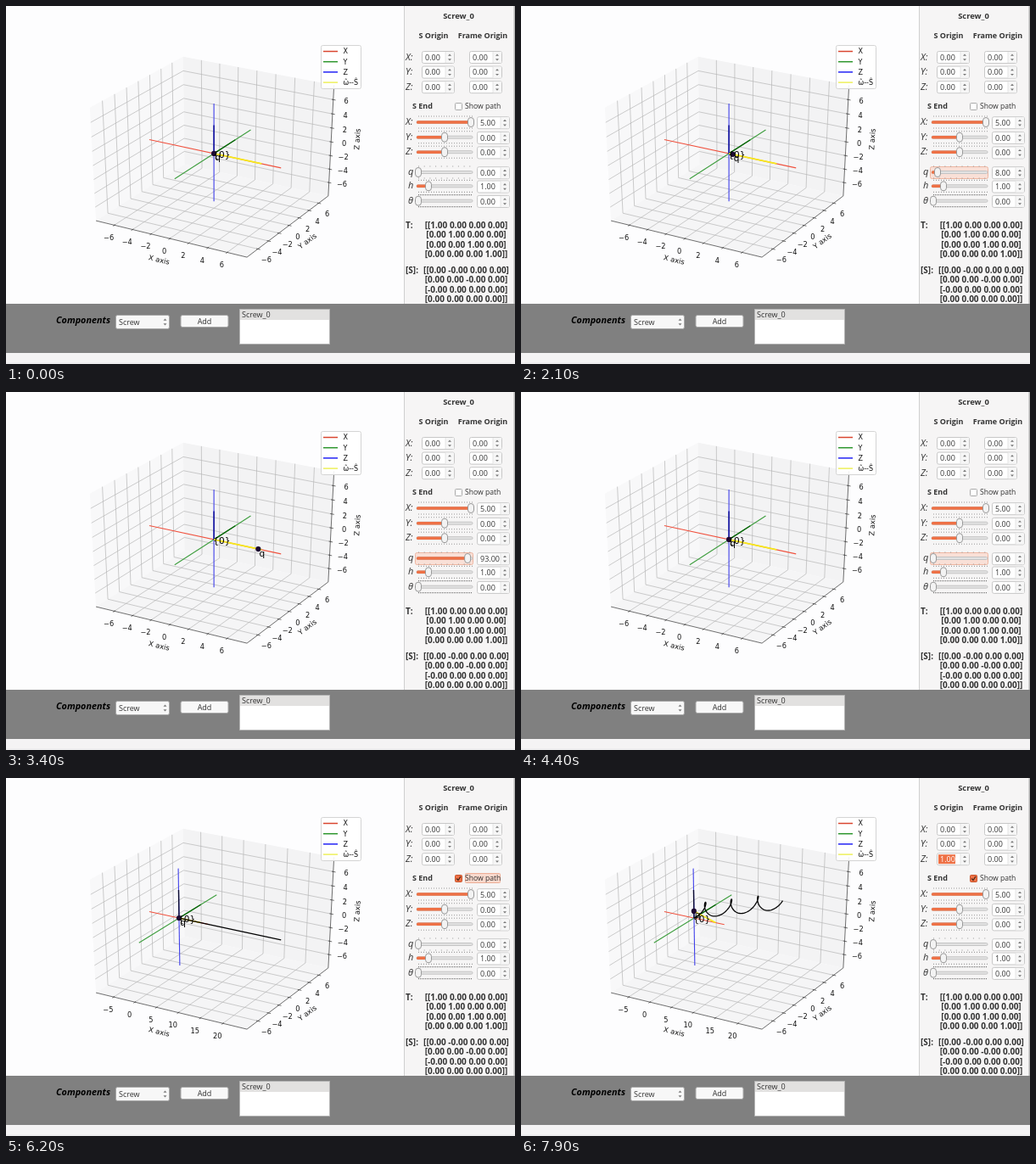
Write an HTML page with a canvas that moves like this. It is 600 px wide and 422 px high and loops after 8000 ms.

```html
<!DOCTYPE html>
<html lang="en">
<head>
<meta charset="utf-8">
<title>Screw motion viewer</title>
<style>
html, body { margin: 0; width: 100%; height: 100%; overflow: hidden; background: #fdfdfe; }
canvas { display: block; width: 600px; height: 422px; }
</style>
</head>
<body>
<canvas id="stage"></canvas>
<script>
const canvas = document.getElementById('stage');
const ctx = canvas.getContext('2d');
const dpr = window.devicePixelRatio || 1;
canvas.width = 600 * dpr;
canvas.height = 422 * dpr;

const UI = '"Open Sans", "Noto Sans", sans-serif';
const PLOT = '"DejaVu Sans", sans-serif';
const ORANGE = '#ee7146';

function text(str, x, y, { size = 9, font = UI, style = '', color = '#333', align = 'left', turn = 0 } = {}) {
  ctx.save();
  ctx.translate(x, y);
  ctx.rotate(turn * Math.PI / 180);
  ctx.font = `${style} ${size}px ${font}`;
  ctx.textAlign = align;
  ctx.textBaseline = 'alphabetic';
  ctx.fillStyle = color;
  ctx.fillText(str, 0, size * 0.36);
  ctx.restore();
}

function rect(x, y, w, h, fill, stroke, r = 0) {
  ctx.beginPath();
  ctx.roundRect(x, y, w, h, r);
  if (fill) { ctx.fillStyle = fill; ctx.fill(); }
  if (stroke) { ctx.strokeStyle = stroke; ctx.lineWidth = 1; ctx.stroke(); }
}

function line(points, color, width = 1) {
  ctx.beginPath();
  points.forEach(p => ctx.lineTo(p[0], p[1]));
  ctx.strokeStyle = color;
  ctx.lineWidth = width;
  ctx.stroke();
}

function fillPoly(points, color) {
  ctx.beginPath();
  points.forEach(p => ctx.lineTo(p[0], p[1]));
  ctx.fillStyle = color;
  ctx.fill();
}

function arrows(x, y, gap) {
  fillPoly([[x - 2, y - gap], [x + 2, y - gap], [x, y - gap - 2.2]], '#777');
  fillPoly([[x - 2, y + gap], [x + 2, y + gap], [x, y + gap + 2.2]], '#777');
}

// ---------- 3D plot ----------

// Perspective view of the unit cube: azimuth -60, elevation 30, distance 10.
function project(x, y, z) {
  const depth = 10 - (0.433 * x - 0.75 * y + 0.5 * z);
  return [245.1 + 2054 * (0.866 * x + 0.5 * y) / depth,
          173.9 - 1524 * (-0.25 * x + 0.433 * y + 0.866 * z) / depth];
}

const MARGIN = 1.1457;
const PATH_END = 23.1;
const scale = (v, lo, hi) => (v - (lo + hi) / 2) / ((hi - lo) * MARGIN);
const cube = pts => pts.map(p => project(...p));
const EVEN = [-6, -4, -2, 0, 2, 4, 6];
const minus = v => String(v).replace('-', '\u2212');

function drawAxes(scaleX, xTicks) {
  const h = 0.5;
  fillPoly(cube([[-h, -h, -h], [-h, h, -h], [-h, h, h], [-h, -h, h]]), '#f8f8f9');
  fillPoly(cube([[-h, h, -h], [h, h, -h], [h, h, h], [-h, h, h]]), '#f3f3f4');
  fillPoly(cube([[-h, -h, -h], [h, -h, -h], [h, h, -h], [-h, h, -h]]), '#f5f5f6');

  const grid = pts => line(cube(pts), '#b6b6b6', 0.7);
  const tick = pts => line(cube(pts), '#333', 0.7);
  const label = (v, p, dx, dy) =>
    text(minus(v), p[0] + dx, p[1] + dy, { font: PLOT, size: 8.2, color: '#111', align: 'center' });

  for (const v of xTicks) {
    const t = scaleX(v);
    grid([[t, -h, -h], [t, h, -h], [t, h, h]]);
    tick([[t, -h + 0.01, -h], [t, -h - 0.015, -h]]);
    label(v, project(t, -h, -h), -6.5, 14.7);
  }
  for (const v of EVEN) {
    const t = scale(v, -7, 7);
    grid([[h, t, -h], [-h, t, -h], [-h, t, h]]);
    grid([[h, h, t], [-h, h, t], [-h, -h, t]]);
    tick([[h - 0.01, t, -h], [h + 0.015, t, -h]]);
    tick([[h - 0.01, h, t], [h + 0.015, h, t]]);
    label(v, project(h, t, -h), 10, 13);
    label(v, project(h, h, t), 15.3, 2);
  }
  line(cube([[-h, -h, -h], [h, -h, -h], [h, h, -h], [h, h, h]]), '#333', 0.7);

  const title = { font: PLOT, size: 8.4, color: '#111', align: 'center' };
  text('X axis', 180.5, 299, { ...title, turn: 13.4 });
  text('Y axis', 355, 277, { ...title, turn: -37 });
  text('Z axis', 414, 157, { ...title, turn: -87 });
}

// Path of the origin turning and sliding along a screw axis through (0, 0, 1).
function helix(a) {
  const sx = 0.981, sz = 0.196, slide = 0.965 * a, c = 1 - Math.cos(a);
  return [slide * sx - sx * sz * c, sx * Math.sin(a), slide * sz + c * (1 - sz * sz)];
}

function drawPlot({ q, path, originZ }) {
  const hi = path ? PATH_END : 7;
  const scaleX = v => scale(v, -7, hi);
  const at = (x, y, z) => project(scaleX(x), scale(y, -7, 7), scale(z, -7, 7));
  const o = at(0, 0, 0);

  drawAxes(scaleX, path ? [-5, 0, 5, 10, 15, 20] : EVEN);

  line([at(-7, 0, 0), at(7, 0, 0)], '#f0523f', 1.1);
  line([at(0, -7, 0), at(0, 7, 0)], '#3f9f3f', 1.1);
  line([at(0, 0, -7), at(0, 0, 7)], '#4040ea', 1.1);
  line([o, at(0, 4, 0)], '#0c650c', 1.4);
  line([o, at(0, 0, 4)], path ? '#0a0a30' : '#0a0a90', 1.4);
  line([at(0, 0, originZ), at(5, 0, 0)], '#f6e91c', 1.7);

  if (path) {
    const pts = originZ
      ? Array.from({ length: 202 }, (_, i) => at(...helix(i / 10)))
      : [o, at(PATH_END, 0, 0)];
    line(pts, '#000', 1.3);
  }

  const dot = at(q / 20, 0, originZ);
  ctx.beginPath();
  ctx.arc(dot[0], dot[1], 3.1, 0, 7);
  ctx.fillStyle = '#1c0830';
  ctx.fill();
  const tag = { font: PLOT, size: 10.5, color: '#000' };
  text('{0}', o[0] - 0.8, o[1] + 1.2, tag);
  text('q', dot[0] + 1.2, dot[1] + 4.8, tag);

  rect(371.5, 46.5, 47, 51, 'rgba(255,255,255,.9)', '#d4d4d4', 2);
  [['X', '#d9452f'], ['Y', '#2c962c'], ['Z', '#2222f5'], ['ω̂--Ŝ', '#eef05a']].forEach(([name, color], i) => {
    const y = 53.5 + i * 12.2;
    line([[374, y], [391, y]], color, 1.5);
    text(name, 397.5, y, { font: PLOT, size: 8, color: '#111' });
  });
}

// ---------- Controls ----------

function spin(x, y, value, selected) {
  rect(x + 0.5, y - 7, 38, 14, '#fff', '#c8c8c8', 2);
  rect(x + 28, y - 6.5, 10, 13, '#f6f6f6');
  line([[x + 28, y - 6.5], [x + 28, y + 6.5]], '#dcdcdc', 0.7);
  arrows(x + 33, y, 1.8);
  if (selected) rect(x + 2, y - 5.5, 20, 11, ORANGE);
  text(value.toFixed(2), x + 4, y, { color: selected ? '#fff' : '#333' });
}

function dots(y, gap, color) {
  ctx.fillStyle = color;
  for (let x = 486; x < 550; x += gap) ctx.fillRect(x, y, 1, 1);
}

function slider(y, handle, gap, color) {
  dots(y - 7.5, gap, color);
  dots(y + 6.5, gap, color);
  rect(484, y - 1.5, 66, 3, '#e2e2e2', '#c4c4c4', 1.5);
  rect(484, y - 1.8, handle - 484, 3.6, ORANGE, null, 1.5);
  rect(handle - 3.5, y - 5.5, 7, 11, '#f3f3f3', '#999', 3.5);
}

function drawPanel({ q, qHover, path, pathHover, originZ }) {
  const bold = { style: 'bold' };
  const mid = { style: 'bold', align: 'center' };
  rect(469, 0, 130, 352, '#f6f5f5');
  line([[469.5, 0], [469.5, 352]], '#cfcfcf');
  rect(598.5, 0, 1.5, 352, '#b4b4b4');

  text('Screw_0', 533.5, 12, { ...mid, size: 9.4 });
  text('S Origin', 504, 35, mid);
  text('Frame Origin', 562, 35, mid);

  const name = { style: 'italic', size: 11 };
  ['X:', 'Y:', 'Z:'].forEach((s, i) => {
    const y = 60.5 + i * 17.6, z = i === 2 ? originZ : 0;
    text(s, 471, y - 0.8, name);
    spin(490, y, z, z > 0);
    spin(546, y, 0);
  });

  text('S End', 479, 118, bold);
  if (pathHover) rect(541.5, 112.5, 41, 11, '#f9d9cd', '#edae96', 1);
  rect(529.5, 114.5, 8, 8, path ? ORANGE : '#fff', path ? '#c9552c' : '#aaa', 1);
  if (path) line([[531.2, 118.5], [533, 120.5], [536, 116]], '#4a2a1c', 1.3);
  text('Show path', 541, 118, { size: 8.6 });

  if (qHover) rect(482.5, 189.5, 68, 14, '#f9e0d7', '#eeb6a1', 2);
  [
    ['X:', 137, 548, 3, '#999', 5],
    ['Y:', 154.7, 517, 3, '#999', 0],
    ['Z:', 172.2, 517, 3, '#999', 0],
    ['q', 196, 486 + q * 0.625, 6.7, '#999', q],
    ['h', 212.3, 498, 3, '#888', 1],
    ['θ', 229.7, 486, 2, '#555', 0]
  ].forEach(([label, y, handle, gap, color, value], i) => {
    text(label, i < 3 ? 471 : 474, y - 1, name);
    slider(y, handle, gap, color);
    spin(555, y + 0.7, value);
  });

  const matrix = (title, y0, rows) => {
    text(title, 471, y0, { style: 'bold', size: 10 });
    rows.forEach((row, i) => text(row, 542.5, y0 + i * 11.5, { ...mid, size: 10 }));
  };
  matrix('T:', 258, ['[[1.00 0.00 0.00 0.00]', '[0.00 1.00 0.00 0.00]',
                     '[0.00 0.00 1.00 0.00]', '[0.00 0.00 0.00 1.00]]']);
  matrix('[S]:', 311, ['[[0.00 -0.00 0.00 0.00]', '[0.00 0.00 -0.00 0.00]',
                       '[-0.00 0.00 0.00 0.00]', '[0.00 0.00 0.00 0.00]]']);
}

function drawFooter() {
  rect(0, 351, 600, 58, '#808080');
  rect(0, 409, 600, 13, '#f4f3f4');
  line([[0, 421], [600, 421]], '#e6e6e8');
  text('Components', 59, 370, { style: 'italic bold', size: 10.8, color: '#000' });
  rect(129.5, 364.5, 63, 16, '#f7f7f7', '#a8a8a8', 2);
  text('Screw', 133, 372.5);
  arrows(187.5, 372.5, 1.8);
  rect(206, 364.5, 56, 14, '#f8f8f8', '#a8a8a8', 2);
  text('Add', 234, 371.5, { align: 'center' });
  rect(275.5, 357.5, 106, 41, '#fff', '#b5b5b5');
  rect(276, 358, 105, 12, '#e2e1e0');
  text('Screw_0', 278, 364);
}

// ---------- Timeline ----------

const ramp = (t, a, b) => Math.min(1, Math.max(0, (t - a) / (b - a)));

function stateAt(t) {
  return {
    q: Math.round(100 * (ramp(t, 1985, 3507) - ramp(t, 3600, 4300))),
    qHover: t >= 1900 && t < 4600,
    path: t >= 5300,
    pathHover: t >= 4800 && t < 6700,
    originZ: t >= 7300 ? 1 : 0
  };
}

const start = performance.now();
function frame(now) {
  const t = Math.floor((Math.max(0, now - start) % 8000) / 100) * 100;
  const state = stateAt(t);
  ctx.setTransform(dpr, 0, 0, dpr, 0, 0);
  rect(0, 0, 600, 422, '#fdfdfe');
  drawPlot(state);
  drawPanel(state);
  drawFooter();
  requestAnimationFrame(frame);
}
frame(start);
</script>
</body>
</html>
```
